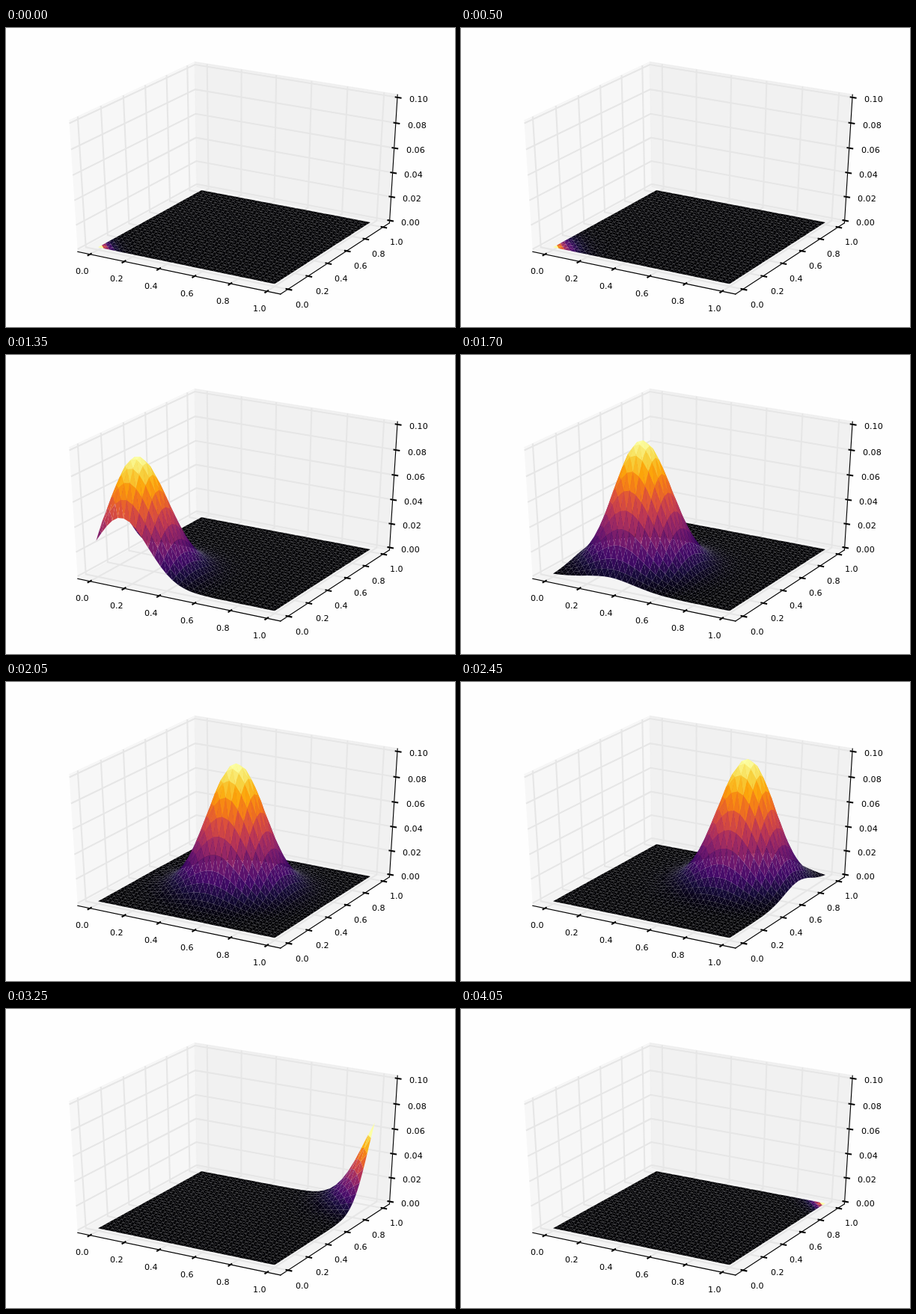
Write an HTML page with a canvas that moves like this. It is 600x400 px and loops after 4100 ms.

```html
<!DOCTYPE html>
<html lang="en">
<head>
<meta charset="utf-8">
<title>Moving peak</title>
<style>
html, body { margin: 0; width: 100%; height: 100%; overflow: hidden; background: #fefefe; }
canvas { display: block; }
</style>
</head>
<body>
<canvas id="stage" width="600" height="400"></canvas>
<script>
const ctx = document.getElementById('stage').getContext('2d');
const LOOP = 4100, STEP = 50;
const N = 30;            // mesh cells per side
const SPREAD = 0.041;    // 2 * sigma^2 of the bell
const SPEED = 0.4925;    // peak travel per second, along x and y alike
const PEAK = 1.005;      // height relative to the z axis range
const B = 0.5 + 1 / 48;  // half size of the padded box
const LABEL_GAP = 0.0701;
const TICK_IN = 0.1 / 12, TICK_OUT = 0.2 / 12;

// Perspective camera: azimuth -60, elevation 30, distance 10
const AZ = -Math.PI / 3, EL = Math.PI / 6;
const ca = Math.cos(AZ), sa = Math.sin(AZ), ce = Math.cos(EL), se = Math.sin(EL);

function project([x, y, z]) {
  const right = -sa * x + ca * y;
  const up = -se * ca * x - se * sa * y + ce * z;
  const w = 10 - (ce * ca * x + ce * sa * y + se * z);
  return [307.5 + 3003 * right / w, 195.2 - 1921.9 * up / w, w];
}

const flat = v => (v - 0.5) / 1.1;   // data x or y to box units
const tall = v => v - 0.5;           // data z (0..1 of range) to box units

const INFERNO = ['000004', '160b39', '420a68', '6a176e', '932667', 'bc3754',
  'dd513a', 'f37819', 'fca50a', 'f6d746', 'fcffa4']
  .map(h => [0, 2, 4].map(i => parseInt(h.slice(i, i + 2), 16)));

function heat(v) {
  const p = Math.min(Math.max(v, 0), 1) * (INFERNO.length - 1);
  const i = Math.min(Math.floor(p), INFERNO.length - 2);
  const rgb = INFERNO[i].map((c, k) => Math.round(c + (INFERNO[i + 1][k] - c) * (p - i)));
  return `rgb(${rgb})`;
}

function trace(points) {
  ctx.beginPath();
  points.forEach((p, i) => {
    const [x, y] = project(p);
    if (i) ctx.lineTo(x, y); else ctx.moveTo(x, y);
  });
}

function line(points, color, width, cap = 'butt') {
  trace(points);
  ctx.strokeStyle = color;
  ctx.lineWidth = width;
  ctx.lineCap = cap;
  ctx.stroke();
}

function pane(points, level) {
  const color = `rgba(${level},${level},${level},0.5)`;
  trace(points);
  ctx.closePath();
  ctx.fillStyle = color;
  ctx.fill();
  line(points, color, 1.39);
}

function label(text, at) {
  const [x, y] = project(at);
  const left = Math.round(x + 0.3 - ctx.measureText(text).width / 2);
  ctx.fillText(text, left, Math.round(y + 8.8));
}

// Each axis: edge line, grid path, tick segment and label anchor at position v
const axes = [
  {
    scale: flat, max: 1, digits: 1,
    at: v => [v, -B, -B],
    grid: v => [[v, -B, -B], [v, B, -B], [v, B, B]],
    tick: v => [[v, -B + TICK_IN, -B], [v, -B - TICK_OUT, -B]],
    text: v => [v, -B - LABEL_GAP, -B - LABEL_GAP]
  },
  {
    scale: flat, max: 1, digits: 1,
    at: v => [B, v, -B],
    grid: v => [[B, v, -B], [-B, v, -B], [-B, v, B]],
    tick: v => [[B - TICK_IN, v, -B], [B + TICK_OUT, v, -B]],
    text: v => [B + LABEL_GAP, v, -B - LABEL_GAP]
  },
  {
    scale: tall, max: 0.1, digits: 2,
    at: v => [B, B, v],
    grid: v => [[-B, -B, v], [-B, B, v], [B, B, v]],
    tick: v => [[B - TICK_IN, B, v], [B + TICK_OUT, B, v]],
    text: v => [B + LABEL_GAP, B + LABEL_GAP, v]
  }
];

function drawBox() {
  ctx.fillStyle = '#fefefe';
  ctx.fillRect(0, 0, 600, 400);
  pane([[-B, -B, -B], [-B, B, -B], [-B, B, B], [-B, -B, B]], 242);
  pane([[-B, B, -B], [B, B, -B], [B, B, B], [-B, B, B]], 230);
  pane([[-B, -B, -B], [B, -B, -B], [B, B, -B], [-B, B, -B]], 236);

  ctx.font = '11.11px "DejaVu Sans", sans-serif';
  for (const a of axes) {
    const marks = [0, 1, 2, 3, 4, 5].map(i => i / 5);
    line([a.at(-B), a.at(B)], '#000', 1.11, 'square');
    marks.forEach(m => line(a.grid(a.scale(m)), '#e6e6e6', 2.08));
    marks.forEach(m => line(a.tick(a.scale(m)), '#000', 2.08, 'square'));
    ctx.fillStyle = '#000';
    marks.forEach(m => label((m * a.max).toFixed(a.digits), a.text(a.scale(m))));
  }
}

// Two triangles per cell, as vertex indices
const faces = [];
for (let j = 0; j < N; j++) {
  for (let i = 0; i < N; i++) {
    const a = j * (N + 1) + i, b = a + 1, c = a + N + 1, d = c + 1;
    faces.push([a, b, c], [b, d, c]);
  }
}

function rise(c) {
  const u = Math.min(Math.max((c + 0.25) / 0.5, 0), 1);
  return u * u * (3 - 2 * u);
}

function drawSurface(t) {
  const c = 0.501 + SPEED * (t - LOOP / 2) / 1000;
  const height = PEAK * rise(c);
  const verts = [];
  for (let j = 0; j <= N; j++) {
    for (let i = 0; i <= N; i++) {
      const x = i / N, y = j / N;
      const g = Math.exp(-((x - c) ** 2 + (y - c) ** 2) / SPREAD);
      const [px, py, w] = project([flat(x), flat(y), tall(g * height)]);
      verts.push({ px, py, w, g });
    }
  }
  const tris = faces.map(f => {
    const v = f.map(i => verts[i]);
    return { v, g: (v[0].g + v[1].g + v[2].g) / 3, w: v[0].w + v[1].w + v[2].w };
  });
  let lo = Infinity, hi = -Infinity;
  for (const { g } of tris) {
    lo = Math.min(lo, g);
    hi = Math.max(hi, g);
  }
  tris.sort((p, q) => q.w - p.w);
  for (const { v, g } of tris) {
    ctx.beginPath();
    ctx.moveTo(v[0].px, v[0].py);
    ctx.lineTo(v[1].px, v[1].py);
    ctx.lineTo(v[2].px, v[2].py);
    ctx.closePath();
    ctx.fillStyle = heat((g - lo) / (hi - lo));
    ctx.fill();
  }
}

const start = performance.now();
let shown = -1;

function frame() {
  const t = Math.max(0, performance.now() - start) % LOOP;
  const step = Math.floor(t / STEP);
  if (step !== shown) {
    shown = step;
    drawBox();
    drawSurface(step * STEP);
  }
  requestAnimationFrame(frame);
}
frame();
</script>
</body>
</html>
```
